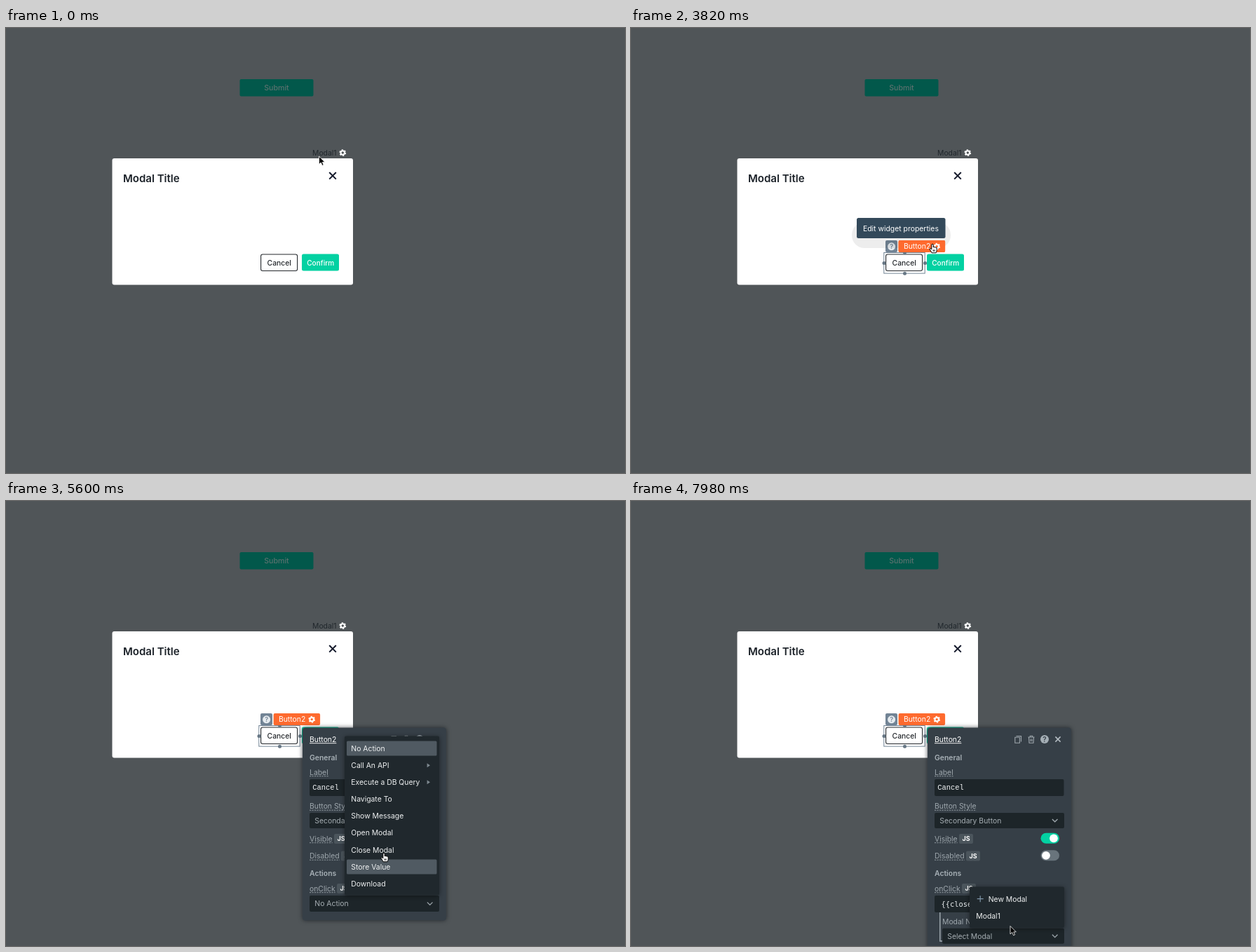
Write an HTML page that moves like this. It is 883 by 635 pixels and loops after 8000 ms.

```html
<!DOCTYPE html>
<html lang="en">
<head>
<meta charset="utf-8">
<title>Modal editor</title>
<style>
  html, body { margin: 0; width: 100%; height: 100%; overflow: hidden; background: #505558; }
  svg { display: block; width: 100vw; height: 100vh; }
  text { font: 400 10.4px Inter, "Open Sans", sans-serif; white-space: pre; }
  .medium { font-weight: 500; }
  .bold { font-weight: 600; }
  .title { font-size: 15px; font-weight: 600; }
  .field { font-family: "Liberation Mono", monospace; }
  .code { font-family: "DejaVu Sans Mono", monospace; }
  .badge { font-size: 9px; font-weight: 700; }
  .panel { filter: drop-shadow(0 0 3px rgba(20, 26, 30, .75)); }
  .menu { filter: drop-shadow(0 1px 3px rgba(0, 0, 0, .45)); }
</style>
</head>
<body>
<svg id="stage" viewBox="0 0 883 635"></svg>
<script>
const LOOP = 8000;
const DARK = '#363f47', FIELD = '#1d2529', MENU = '#20282d', ACTIVE = '#505a62';
const MUTED = '#9ea7ad', GREEN = '#03d1a2', ORANGE = '#fe6a2e', SLATE = '#728495';

// Moments at which the interface changes
const HOVER = 2330, SELECT = 2920, LEAVE = 3220, EDIT = 3820, PANEL = 3970;
const TIP_END = 4260, MENU_OPEN = 5300, MENU_CLOSE = 6640, PICKED = 6790, MODALS = 7830;

// Cursor holds: time, x, y, shape
const moves = [
  [0, 446.5, 183, 'arrow'], [600, 444, 195, 'arrow'], [750, 436, 228, 'arrow'],
  [900, 422, 270, 'arrow'], [1040, 406, 306, 'arrow'], [1180, 397, 325, 'arrow'],
  [1330, 397, 329, 'arrow'], [1620, 397, 333, 'arrow'], [1770, 406, 322, 'arrow'],
  [HOVER, 407, 324.5, 'hand'], [3070, 410, 323, 'hand'], [LEAVE, 418, 318, 'hand'],
  [3370, 426, 312, 'hand'], [3520, 430, 308, 'hand'], [4110, 433, 318, 'hand'],
  [4260, 452, 365, 'arrow'], [4410, 482, 440, 'arrow'], [4560, 510, 515, 'arrow'],
  [4700, 524, 560, 'arrow'], [4850, 528, 572.5, 'arrow'], [5000, 529.5, 572.5, 'hand'],
  [5450, 535, 545, 'hand'], [5600, 539, 502, 'hand'], [5750, 539, 496, 'hand'],
  [5900, 538.5, 493, 'hand'], [6490, 538, 492.5, 'arrow'], [6790, 536, 500, 'arrow'],
  [6940, 528, 540, 'arrow'], [7090, 518, 582, 'arrow'], [7380, 514, 600, 'arrow'],
  [7530, 512, 616, 'hand'], [MODALS, 514, 616, 'hand'], [7980, 541, 606.5, 'arrow']
];

const during = (from, to, body) => `<g data-from="${from}" data-to="${to}">${body}</g>`;
const group = (cls, body) => `<g class="${cls}">${body}</g>`;
const rect = (x, y, w, h, fill, r = 2, extra = '') =>
  `<rect x="${x}" y="${y}" width="${w}" height="${h}" rx="${r}" fill="${fill}" ${extra}/>`;
const circle = (x, y, r, fill) => `<circle cx="${x}" cy="${y}" r="${r}" fill="${fill}"/>`;
const stroke = (d, color, width = 1.2, extra = '') =>
  `<path d="${d}" fill="none" stroke="${color}" stroke-width="${width}" ${extra}/>`;
// y is the middle of the capital letters
const text = (x, y, str, fill, cls = '', extra = '') =>
  `<text x="${x}" y="${y}" dy=".364em" fill="${fill}" class="${cls}" ${extra}>${str}</text>`;
const centered = (x, y, str, fill, cls, size) =>
  text(x, y, str, fill, cls, `text-anchor="middle" style="font-size:${size}px"`);

const cross = (x, y, r, color, width) =>
  stroke(`M${x - r} ${y - r}l${2 * r} ${2 * r}m0 ${-2 * r}l${-2 * r} ${2 * r}`, color, width);
const chevron = (x, y) => stroke(`M${x - 3.8} ${y - 2}l3.8 3.8 3.8 -3.8`, MUTED, 1.3);
const gear = (x, y) => `<g fill="none" stroke="#fff" transform="translate(${x} ${y})">
  <circle r="2.7" stroke-width="2.1"/>
  <circle r="4" stroke-width="1.7" stroke-dasharray="2.2 1.99"/></g>`;
const help = (x, y, r, fill, ink) =>
  circle(x, y, r, fill) + centered(x, y, '?', ink, 'bold', r * 1.65);

const nameTag = (x, fill) =>
  rect(x, 303, 66.5, 17, fill) + text(x + 7.3, 311.5, 'Button2', '#fff') + gear(x + 54.6, 311.7);
const caption = (x, y, str) => text(x, y, str, MUTED, 'dashed');
const heading = (y, str) => text(433, y, str, '#a8b1b7', 'bold');
const badge = (x, y) =>
  rect(x, y - 7, 20, 14, '#4b555c') + centered(x + 10, y, 'JS', '#fff', 'badge', 9);
const select = (x, y, str, h = 22) =>
  rect(x, y - h / 2, 618 - x, h, FIELD) + text(x + 7.3, y, str, '#a5adb2') + chevron(604.7, y);
const toggle = (y, on) =>
  rect(584.5, y - 7.5, 26.5, 15, on ? GREEN : '#69747c', 7.5) +
  circle(on ? 603 : 592, y, 5.9, '#fff');

function page() {
  return rect(0, 0, 883, 635, '#505558', 0) +
    rect(333.5, 73, 105, 24.5, '#02584b') +
    centered(386, 85.5, 'Submit', '#5a716e', 'medium', 10.6) +
    text(437, 178, 'Modal1', '#20272c') + gear(480.3, 178) +
    rect(151.5, 186, 343.5, 180.5, '#fff', 3) +
    text(167, 214.3, 'Modal Title', '#1c2229', 'title') +
    cross(466, 210.8, 4.8, '#14192b', 2) +
    rect(363.6, 323, 52, 23.5, '#fff', 2.5, 'stroke="#24282c" stroke-width="1.1"') +
    rect(422, 322.5, 53, 24, GREEN, 2.5) +
    centered(448.7, 335, 'Confirm', '#fff', 'medium', 10.1);
}

function selection() {
  const dots = [[361, 335.5], [419.5, 335.5], [390.5, 350.3], [390.5, 320.5]];
  return during(HOVER, LEAVE,
      rect(363.8, 323, 52.4, 23.5, '#efeded', 2.5, 'stroke="#24282c" stroke-width="1.3"')) +
    centered(389.7, 335, 'Cancel', '#24282c', 'medium', 10.3) +
    during(HOVER, LOOP,
      rect(360.8, 320.5, 58.4, 29.6, 'none', 0, `stroke="${SLATE}"`) +
      dots.map(([x, y]) => circle(x, y, 2.5, '#667684')).join('')) +
    during(HOVER, SELECT, nameTag(363, DARK)) +
    during(SELECT, LOOP, rect(363, 303, 17, 17, SLATE) + help(371.6, 311.8, 5.5, '#e6ebef', SLATE)) +
    during(SELECT, EDIT, nameTag(381.6, DARK)) +
    during(EDIT, LOOP, nameTag(381.6, ORANGE)) +
    during(EDIT, TIP_END,
      rect(315, 277, 141, 37, 'rgba(0,0,0,.07)', 18) +
      rect(322, 271, 126.5, 29, '#33495a', 2.5) +
      text(331, 286, 'Edit widget properties', '#fff') + nameTag(381.6, ORANGE));
}

function panel() {
  const icons =
    stroke('M549.5 335.5h7v8M547.8 337.3h6.6v8h-6.6z', MUTED, 1.1) +
    stroke('M566.5 337h9M569.3 336.8v-1.6h3.4v1.6M567.5 337.3l.5 8h6l.5-8M570 339.5v3.6M572 339.5v3.6', MUTED, 1.1) +
    help(590, 340, 6, '#a5afb6', DARK) + cross(609, 340, 3.6, '#b4bcc2', 1.5);
  return during(PANEL, PICKED, group('panel', rect(423, 323.5, 205, 275, DARK, 4))) +
    during(PICKED, LOOP, group('panel', rect(423, 323.5, 205, 330, DARK, 4))) +
    during(PANEL, LOOP,
      text(433, 340, 'Button2', '#fff', 'lined') + icons +
      heading(366, 'General') +
      caption(433, 387, 'Label') +
      rect(433, 397, 184.5, 24, FIELD) + text(437.3, 408.5, 'Cancel', '#f2f4f5', 'field') +
      caption(433, 435.5, 'Button Style') + select(433, 456, 'Secondary Button') +
      caption(433, 482, 'Visible') + badge(468, 482) + toggle(481.3, true) +
      caption(433, 506.5, 'Disabled') + badge(478, 506.5) + toggle(505.8, false) +
      heading(531, 'Actions') +
      caption(433, 553, 'onClick') + badge(472, 553)) +
    during(PANEL, PICKED, select(433, 574.6, 'No Action', 23)) +
    during(PICKED, LOOP,
      rect(433, 563, 185, 24, FIELD) +
      text(442.5, 575, '{{closeModal()}}', '#e8ecee', 'code') +
      stroke('M440.8 587v41h4', '#a5afb6', 1.4) +
      text(444, 600, 'Modal Name', MUTED) + select(444, 620.8, 'Select Modal'));
}

function actionMenu() {
  const actions = ['No Action', 'Call An API', 'Execute a DB Query', 'Navigate To',
    'Show Message', 'Open Modal', 'Close Modal', 'Store Value', 'Download'];
  const rowY = i => 353 + i * 24.13;
  const mark = i => rect(486, rowY(i) - 10.5, 128.5, 21, ACTIVE, 1.5);
  const arrow = i => `<path d="M600.6 ${rowY(i) - 3}l4.4 3-4.4 3z" fill="#7d888f"/>`;
  return during(MENU_OPEN, MENU_CLOSE,
    group('menu', rect(483, 335.5, 135, 227, MENU)) + mark(0) +
    during(5450, 5600, mark(8)) + during(5600, 5750, mark(7)) + during(5750, MENU_CLOSE, mark(6)) +
    actions.map((name, i) => text(492.3, rowY(i), name, '#eef0f1')).join('') +
    arrow(1) + arrow(2));
}

function modalMenu() {
  return during(MODALS, LOOP,
    group('menu', rect(483, 550.5, 135, 58.5, MENU)) +
    stroke('M493.7 567.7h9M498.2 563.2v9', '#7f95a8', 1.2) +
    text(509.7, 568, 'New Modal', '#eef0f1') + text(492.3, 592, 'Modal1', '#eef0f1'));
}

const cursors =
  `<g id="cursor" stroke-linejoin="round">
    <path id="arrow" d="M0 0V11.5L2.7 9l1.9 4.3 2-.9L4.8 8.4H8.3Z" fill="#000" stroke="#fff" stroke-width=".8"/>
    <path id="hand" d="M-1.2 1Q0-.8 1.2 1V4.7L2 4.2 3.2 5 4.2 4.7 5.2 5.5 6.2 5.6V8.6Q6.2 10.5 5.2 12.8H-1Q-2.4 9.8-4 7.8-4.2 6.2-2.8 6.5L-1.2 8Z M1.2 8.4v2.4M3 8.4v2.4" fill="#fff" stroke="#000"/>
  </g>`;

const stage = document.getElementById('stage');
stage.innerHTML = page() + selection() + panel() + actionMenu() + modalMenu() + cursors;

for (const label of stage.querySelectorAll('.dashed, .lined')) {
  const x = +label.getAttribute('x'), y = +label.getAttribute('y') + 5.7;
  const dashes = label.classList.contains('dashed') ? 'stroke-dasharray="2.2 1.3"' : '';
  label.insertAdjacentHTML('afterend',
    stroke(`M${x} ${y}h${label.getComputedTextLength()}`, label.getAttribute('fill'), 0.9, dashes));
}

const timed = [...stage.querySelectorAll('[data-from]')].map(node =>
  ({ node, from: +node.dataset.from, to: +node.dataset.to }));
const cursor = document.getElementById('cursor');
const shapes = ['arrow', 'hand'].map(id => document.getElementById(id));

function draw(t) {
  for (const { node, from, to } of timed)
    node.style.visibility = t >= from && t < to ? '' : 'hidden';
  const [, x, y, shape] = moves.findLast(move => move[0] <= t);
  cursor.setAttribute('transform', `translate(${x} ${y})`);
  for (const node of shapes) node.style.visibility = node.id === shape ? '' : 'hidden';
}

const start = performance.now();
function tick() {
  draw((performance.now() - start) % LOOP);
  requestAnimationFrame(tick);
}
tick();
</script>
</body>
</html>
```
